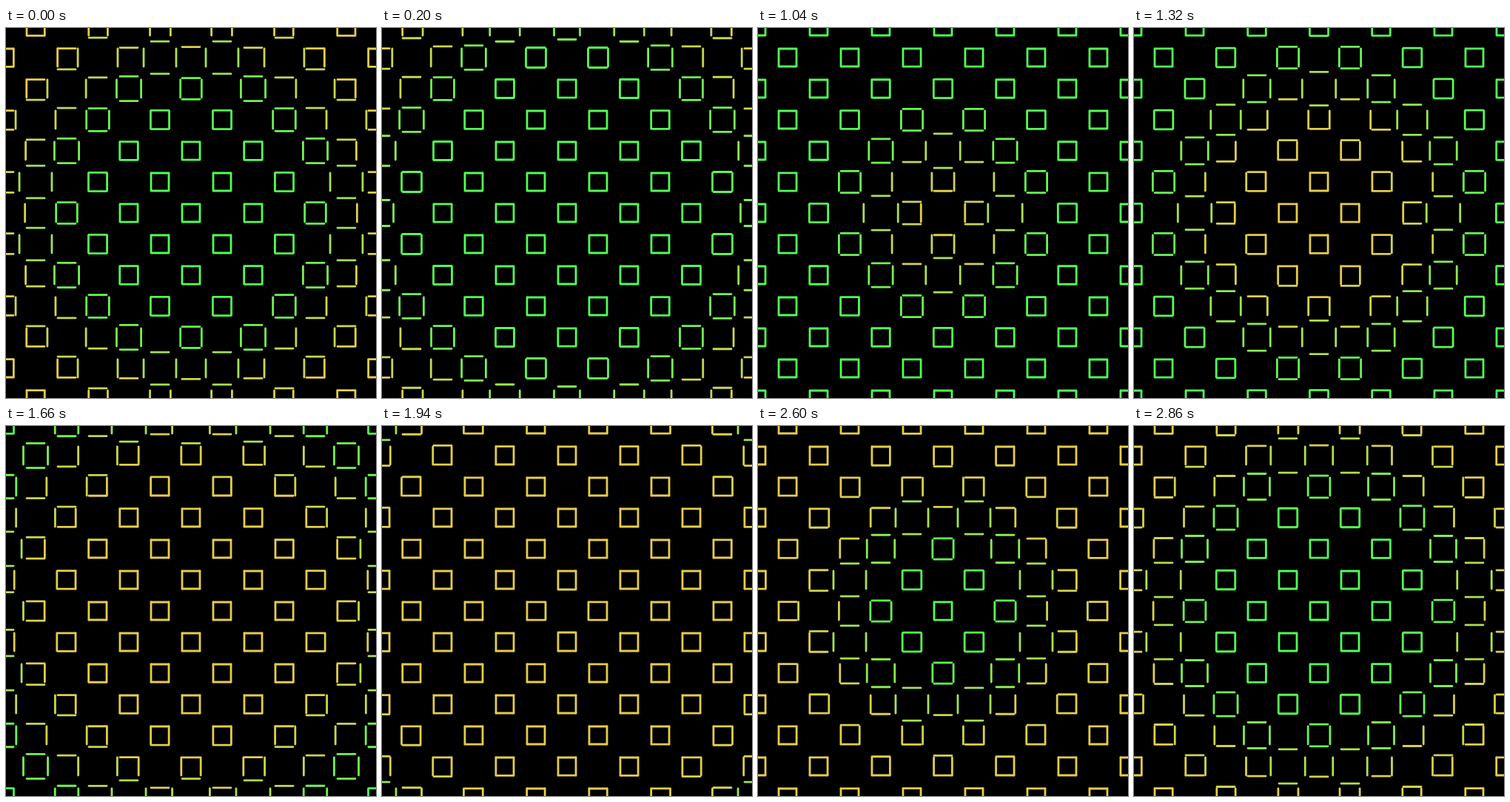
Write an HTML page with a canvas that moves like this. It is 500 px wide and 500 px high and loops after 2880 ms.

```html
<!DOCTYPE html>
<html>
<head>
<meta charset="utf-8">
<style>
  html, body { margin: 0; height: 100%; overflow: hidden; background: #000; }
  canvas { display: block; }
</style>
</head>
<body>
<canvas id="stage" width="500" height="500"></canvas>
<script>
const ctx = document.getElementById('stage').getContext('2d');
const LOOP = 2880, HALF = LOOP / 2;
const CELL = 42, SIDE = 12, REACH = 7;
const GREEN = [80, 255, 84], YELLOW = [230, 204, 74];

const mix = (a, b, p) => a + (b - a) * p;
const ease = t => t < 0.5 ? (2 * t) ** 6 / 2 : 1 - (2 - 2 * t) ** 6 / 2;

// 0 = edges form a green square, 1 = edges have joined the neighbouring yellow ones
function progress(time, radius) {
  const delay = radius / (10 * CELL) * HALF;
  const s = ((time - delay) % LOOP + LOOP) % LOOP;
  return s < HALF ? ease(s / HALF) : 1 - ease(s / HALF - 1);
}

function drawCell(x, y, p) {
  const d = mix(SIDE, CELL - SIDE, p);
  ctx.strokeStyle = `rgb(${GREEN.map((c, k) => Math.round(mix(c, YELLOW[k], p)))})`;
  ctx.beginPath();
  for (const side of [-d, d]) {
    ctx.moveTo(x - SIDE, y + side);
    ctx.lineTo(x + SIDE, y + side);
    ctx.moveTo(x + side, y - SIDE);
    ctx.lineTo(x + side, y + SIDE);
  }
  ctx.stroke();
}

function draw(time) {
  ctx.fillStyle = '#000';
  ctx.fillRect(0, 0, 500, 500);
  ctx.lineWidth = 2.8;
  ctx.lineCap = 'round';
  for (let j = -REACH; j <= REACH; j++) {
    for (let i = -REACH; i <= REACH; i++) {
      if ((i + j) % 2) continue;
      const x = i * CELL, y = j * CELL;
      drawCell(250 + x, 250 + y, progress(time, Math.hypot(x, y)));
    }
  }
}

const start = performance.now();
function frame() {
  draw((performance.now() - start) % LOOP);
  requestAnimationFrame(frame);
}
frame();
</script>
</body>
</html>
```
